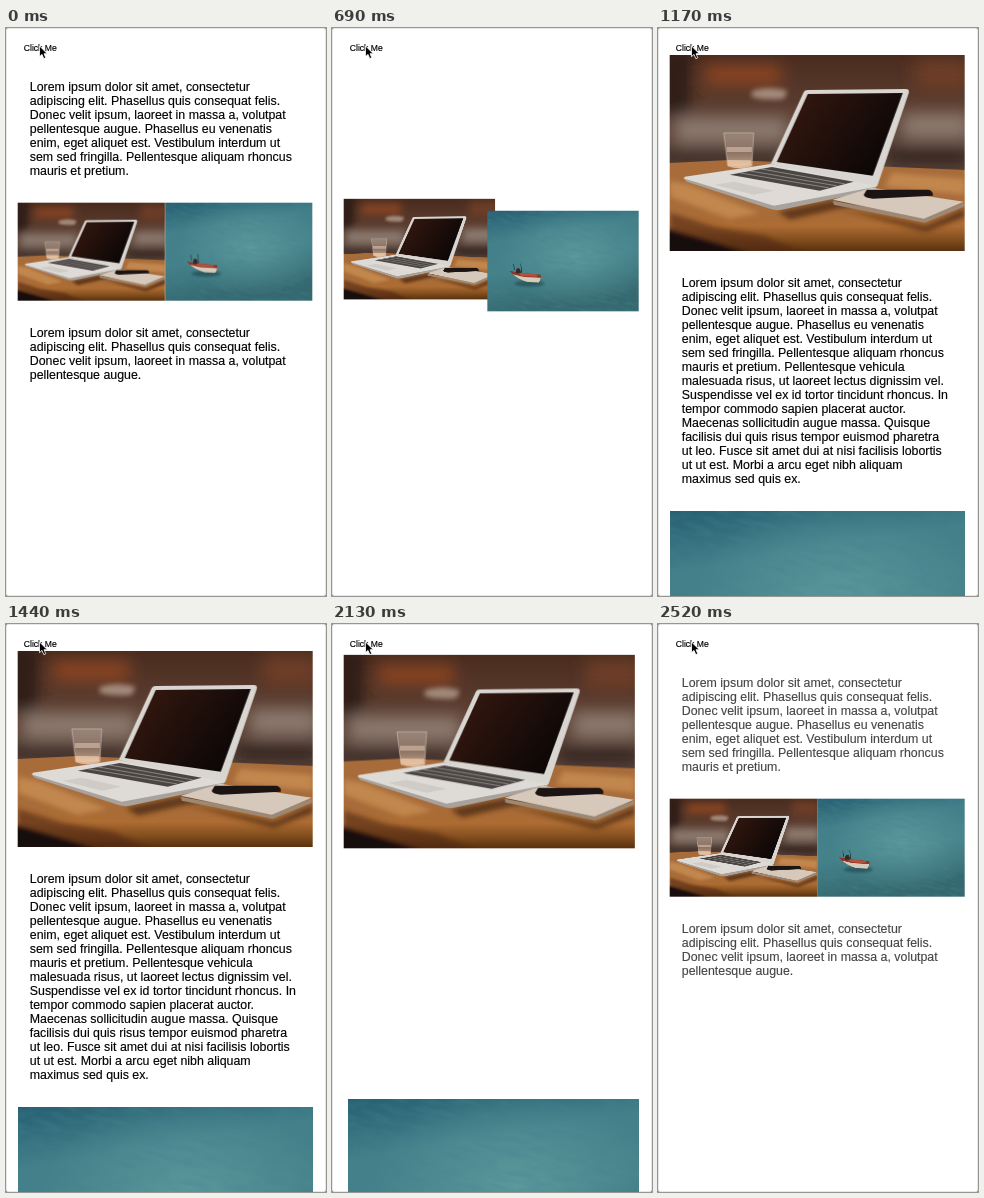
Recreate the animation shown at these times as an HTML page. Size 320x568 px, loop 2550 ms.

```html
<!DOCTYPE html>
<html lang="en">
<head>
<meta charset="utf-8">
<title>Layout toggle</title>
<style>
  html, body {
    margin: 0;
    width: 100%;
    height: 100%;
    overflow: hidden;
    background: #777;
  }
  .stage {
    position: relative;
    width: 320px;
    height: 568px;
    overflow: hidden;
    border-radius: 3px;
    background: #fff;
    box-shadow: inset 0 0 0 1px #e6e6e6;
    color: #000;
    font-family: "Liberation Sans", Arial, sans-serif;
    -webkit-text-stroke: .15px;
  }
  .stage > * { position: absolute; }

  .button { left: 17.8px; top: 14.6px; font-size: 8.6px; line-height: 10px; white-space: pre; }
  .cursor { left: 32px; top: 17px; }

  p {
    left: 23.8px;
    margin: 0;
    font-size: 12.39px;
    line-height: 13.98px;
    white-space: pre;
    animation: 2550ms linear infinite;
  }
  .intro { top: 52px; }
  .outro { top: 297.7px; }
  .full { top: 248.2px; }
  .intro, .outro { animation-name: brief; }
  .full { animation-name: full; }

  .photo {
    left: 0;
    top: 0;
    width: 295px;
    height: 196.4px;
    overflow: hidden;
    transform-origin: 0 0;
    animation: move 2550ms ease-in-out infinite;
  }
  .desk {
    --small: translate(11.7px, 174.7px) scale(.5);
    --large: translate(11.7px, 27px) scale(1);
  }
  .sea {
    --small: translate(159.2px, 174.7px) scale(.5);
    --large: translate(11.7px, 482.6px) scale(1);
  }

  @keyframes move {
    0%, 25.882% { transform: var(--small); }
    36.471%, 82.353% { transform: var(--large); }
    92.941%, 100% { transform: var(--small); }
  }
  @keyframes brief {
    0%, 16.863% { opacity: 1; }
    25.882%, 92.941% { opacity: 0; }
    100% { opacity: .87; }
  }
  @keyframes full {
    0%, 36.471% { opacity: 0; }
    44.51%, 73.333% { opacity: 1; }
    82.353%, 100% { opacity: 0; }
  }
</style>
</head>
<body>
<div class="stage">
  <div class="button">Click Me</div>

  <p class="intro">Lorem ipsum dolor sit amet, consectetur
adipiscing elit. Phasellus quis consequat felis.
Donec velit ipsum, laoreet in massa a, volutpat
pellentesque augue. Phasellus eu venenatis
enim, eget aliquet est. Vestibulum interdum ut
sem sed fringilla. Pellentesque aliquam rhoncus
mauris et pretium.</p>

  <p class="outro">Lorem ipsum dolor sit amet, consectetur
adipiscing elit. Phasellus quis consequat felis.
Donec velit ipsum, laoreet in massa a, volutpat
pellentesque augue.</p>

  <p class="full">Lorem ipsum dolor sit amet, consectetur
adipiscing elit. Phasellus quis consequat felis.
Donec velit ipsum, laoreet in massa a, volutpat
pellentesque augue. Phasellus eu venenatis
enim, eget aliquet est. Vestibulum interdum ut
sem sed fringilla. Pellentesque aliquam rhoncus
mauris et pretium. Pellentesque vehicula
malesuada risus, ut laoreet lectus dignissim vel.
Suspendisse vel ex id tortor tincidunt rhoncus. In
tempor commodo sapien placerat auctor.
Maecenas sollicitudin augue massa. Quisque
facilisis dui quis risus tempor euismod pharetra
ut leo. Fusce sit amet dui at nisi facilisis lobortis
ut ut est. Morbi a arcu eget nibh aliquam
maximus sed quis ex.</p>

  <svg class="photo desk" viewBox="0 0 295 196.6" preserveAspectRatio="none">
    <defs>
      <linearGradient id="wall" x2="0" y2="1">
        <stop offset="0" stop-color="#4a2c1f"/>
        <stop offset=".3" stop-color="#5e4033"/>
        <stop offset=".55" stop-color="#5a463c"/>
      </linearGradient>
      <linearGradient id="wood" x2="0" y2="1">
        <stop offset=".52" stop-color="#a76c3a"/>
        <stop offset=".72" stop-color="#ad6c33"/>
        <stop offset=".86" stop-color="#85501f"/>
        <stop offset="1" stop-color="#55300f"/>
      </linearGradient>
      <linearGradient id="screen" x2="1" y2=".5">
        <stop offset="0" stop-color="#3a1a10"/>
        <stop offset="1" stop-color="#0c0707"/>
      </linearGradient>
      <linearGradient id="glass" x2="0" y2="1">
        <stop offset="0" stop-color="#d8c2b4" stop-opacity=".2"/>
        <stop offset=".5" stop-color="#d8b49c" stop-opacity=".4"/>
        <stop offset="1" stop-color="#edc8a8" stop-opacity=".8"/>
      </linearGradient>
      <filter id="soft" x="-50%" y="-50%" width="200%" height="200%"><feGaussianBlur stdDeviation="8"/></filter>
      <filter id="fuzz" x="-50%" y="-50%" width="200%" height="200%"><feGaussianBlur stdDeviation="2.5"/></filter>
    </defs>
    <path fill="url(#wall)" d="M0 0H295V197H0z"/>
    <g filter="url(#soft)">
      <path fill="#8a4524" d="M35 10H112V30H35z"/>
      <path fill="#2f1c14" d="M-10 -10H20V62H-10z"/>
      <path fill="#6d3c26" d="M245 5H300V35H245z"/>
      <path fill="#8b796e" d="M5 62H118V88H5zM232 58H300V84H232z"/>
      <path fill="#33221b" d="M-10 95H110V106H-10zM218 93H300V109H218z"/>
    </g>
    <path fill="#b39c8d" opacity=".8" filter="url(#fuzz)" d="M82 36Q100 30 118 36L114 44Q96 46 82 42z"/>
    <path fill="url(#wood)" d="M0 108L60 105L295 115V197H0z"/>
    <g filter="url(#fuzz)">
      <path fill="#cf9558" d="M0 126L20 130L90 158L60 164L0 142zM222 118L295 124V140L215 132z" opacity=".65"/>
      <path fill="#4f2a11" d="M0 158L45 172L95 181L135 200H70L0 180z" opacity=".6"/>
      <path fill="#150c08" d="M-5 174L34 185L84 200H-5z"/>
      <path fill="#4a270f" d="M108 157L206 137L220 142L120 165zM163 152L256 171L295 154V162L256 177z" opacity=".75"/>
    </g>
    <path fill="url(#glass)" stroke="#e5d3c6" stroke-opacity=".6" stroke-width=".8" d="M54 78H84L82 111Q69 115 58 111z"/>
    <path fill="#f4dcc4" opacity=".45" d="M57 92H82V97H57zM58 105L81 105V110Q69 113 58 110z"/>
    <path fill="#d9d5d1" d="M134 37Q135 35 138 35L236 34Q240 34 239 38L208 130Q206 134 202 133L101 109z"/>
    <path fill="url(#screen)" d="M138 39L233 38L203 121L107 107z"/>
    <path fill="#dedbd7" d="M15 122L101 109L206 131L205 134L112 153Q106 154 100 152L17 126Q13 124 15 122z"/>
    <path fill="#a9a29c" d="M15 124L104 151L206 132V135L112 155Q106 156 100 154L17 127z"/>
    <path fill="#4a4543" d="M60 120L102 112L184 127L150 136z"/>
    <path stroke="#a8a29d" stroke-width=".7" d="M70 118L159 133M80 116L167 131M91 114L175 129"/>
    <path fill="#cfcbc7" d="M64 127L104 136L84 140L45 130z"/>
    <path fill="#9c8874" d="M163 146L254 163L294 148V152L255 168L164 150z"/>
    <path fill="#d6c9bb" d="M163 145L202 133L294 147L254 164z"/>
    <path fill="#1c1413" d="M197 135L259 135Q264 137 263 141L203 144Q194 143 194 140z"/>
  </svg>

  <svg class="photo sea" viewBox="0 0 295 196.6" preserveAspectRatio="none">
    <defs>
      <linearGradient id="deep" x2=".25" y2="1">
        <stop offset="0" stop-color="#265f72"/>
        <stop offset=".3" stop-color="#438089"/>
        <stop offset=".6" stop-color="#45828a"/>
        <stop offset="1" stop-color="#35696f"/>
      </linearGradient>
      <radialGradient id="shine" cx=".58" cy=".45" r=".5">
        <stop offset="0" stop-color="#68a5a6" stop-opacity=".65"/>
        <stop offset="1" stop-color="#68a5a6" stop-opacity="0"/>
      </radialGradient>
      <filter id="ripple" x="0" y="0" width="100%" height="100%">
        <feTurbulence type="fractalNoise" baseFrequency=".035 .16" numOctaves="3" seed="4"/>
        <feColorMatrix values="0 0 0 0 .06  0 0 0 0 .22  0 0 0 0 .28  1.8 0 0 0 -.7"/>
      </filter>
    </defs>
    <path fill="url(#deep)" d="M0 0H295V197H0z"/>
    <path fill="url(#shine)" d="M0 0H295V197H0z"/>
    <rect x="-60" y="-60" width="420" height="320" transform="rotate(12 147 98)" filter="url(#ripple)" opacity=".5"/>
    <ellipse cx="82" cy="142" rx="29" ry="6" fill="#1f4a50" opacity=".65" filter="url(#fuzz)"/>
    <path fill="#8f3527" d="M43 117L62 121L104 125Q106 132 101 139L78 138Q56 133 43 117z"/>
    <path fill="#d8cabb" d="M50 124L70 129L104 131Q103 137 100 140L78 139Q60 134 50 124z"/>
    <path fill="#b5523c" d="M60 121L98 125L96 129L66 127z"/>
    <path fill="none" stroke="#25373a" stroke-width="1.4" d="M53 116L51 104M67 121L65 103"/>
    <path fill="#382725" d="M56 122Q55 112 60 112T65 122z"/>
  </svg>

  <svg class="cursor" width="11" height="16" viewBox="0 0 11 16">
    <path d="M1.5 1V11.6L4 9.4L5.8 13.6L7.8 12.8L6 8.7H9.3z" fill="#000" stroke="#fff" stroke-width=".8"/>
  </svg>
</div>
</body>
</html>
```
